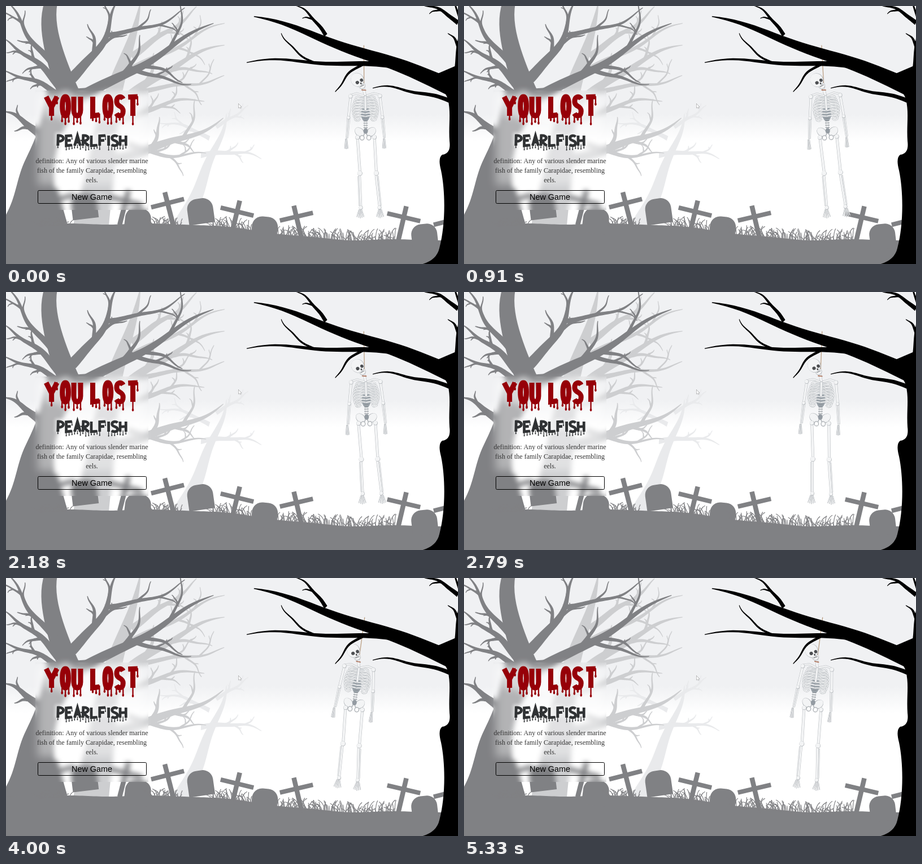
Write an HTML page with a canvas that moves like this. It is 800 by 458 pixels and loops after 5.36 s.

```html
<!DOCTYPE html>
<html lang="en">
<head>
<meta charset="utf-8">
<title>You Lost</title>
<style>
html, body { margin: 0; width: 100%; height: 100%; overflow: hidden; background: #fff; }
canvas { display: block; }
</style>
</head>
<body>
<canvas id="stage" width="800" height="458" role="img" aria-label="YOU LOST. PEARLFISH"></canvas>
<script>
const W = 800, H = 458, LOOP = 5360;
const ctx = document.getElementById('stage').getContext('2d');
const GRAY = '#808184';

function layer() {
  const c = document.createElement('canvas');
  c.width = W; c.height = H;
  return c.getContext('2d');
}

function random(seed) {
  return () => (seed = (seed * 16807) % 2147483647) / 2147483647;
}

function line(c, w, ...p) {
  c.lineWidth = w;
  c.beginPath();
  for (let i = 0; i < p.length; i += 2) c.lineTo(p[i], p[i + 1]);
  c.stroke();
}

function oval(c, x, y, rx, ry, color, tilt = 0) {
  c.fillStyle = color;
  c.beginPath();
  c.ellipse(x, y, rx, ry, tilt, 0, 7);
  c.fill();
}

// Tapered, slightly wavy branch; twigs sprout on alternating sides.
function bough(c, rnd, x0, y0, x1, y1, w, bend = 0, twigs = 3) {
  const len = Math.hypot(x1 - x0, y1 - y0), dir = Math.atan2(y1 - y0, x1 - x0);
  const nx = -Math.sin(dir), ny = Math.cos(dir);
  const phase = rnd() * 6, wave = Math.min(6, len * .035);
  const at = t => {
    const off = bend * Math.sin(Math.PI * t) + wave * Math.sin(t * 9 + phase) * t;
    return [x0 + (x1 - x0) * t + nx * off, y0 + (y1 - y0) * t + ny * off];
  };
  const thick = t => w * (1 - t) ** .85 + 1.2;
  const edge = side => t => {
    const [x, y] = at(t), r = thick(t) / 2 * side;
    return [x + nx * r, y + ny * r];
  };
  const steps = [...Array(31).keys()].map(i => i / 30);
  c.beginPath();
  [...steps.map(edge(1)), ...steps.reverse().map(edge(-1))].forEach(p => c.lineTo(...p));
  c.fill();
  for (let i = 0; i < twigs; i++) {
    const t = .3 + .5 * (i + rnd() * .5) / twigs, [x, y] = at(t);
    const a = dir + (i % 2 ? 1 : -1) * (.5 + rnd() * .5), l = len * (.2 + rnd() * .15);
    bough(c, rnd, x, y, x + l * Math.cos(a), y + l * Math.sin(a), thick(t) * .5, l * .1 * (i % 2 ? -1 : 1), twigs - 2);
  }
}

function tree(c, color, seed, boughs) {
  const rnd = random(seed);
  c.fillStyle = color;
  boughs.forEach(b => bough(c, rnd, ...b));
}

const smooth = (a, b, x) => {
  const u = Math.max(0, Math.min(1, (x - a) / (b - a)));
  return u * u * (3 - 2 * u);
};
const ground = x => 387 + 28 * smooth(300, 620, x) + Math.sin(x / 23);

function sky(c) {
  const g = c.createLinearGradient(0, 0, 0, 240);
  g.addColorStop(0, '#f0f1f3');
  g.addColorStop(.8, '#f0f1f3');
  g.addColorStop(1, '#fff');
  c.fillStyle = '#fff';
  c.fillRect(0, 0, W, H);
  c.fillStyle = g;
  c.fillRect(0, 0, W, 240);
}

function forest(c) {
  tree(c, '#e9eaec', 5, [
    [308, 392, 388, 190, 28, 8, 0],
    [345, 265, 452, 270, 9, -8],
    [360, 235, 270, 205, 7, 6],
    [372, 215, 430, 178, 6]
  ]);
  c.save();
  c.beginPath();
  c.rect(0, 0, 387, H);
  c.clip();
  tree(c, '#cdced0', 12, [
    [150, 395, 235, -5, 62, -8, 0],
    [190, 185, 387, 70, 18, -14],
    [178, 275, 385, 200, 20, 8],
    [182, 210, 350, 165, 12, -8],
    [222, 90, 340, 5, 12],
    [215, 115, 387, 30, 9],
    [235, 152, 387, 128, 8],
    [215, 245, 354, 263, 9, 10]
  ]);
  c.restore();
  tree(c, GRAY, 31, [
    [118, 170, 150, -130, 44, -55, 0],
    [90, 110, 5, -5, 12, -6],
    [92, 140, -5, 62, 13, 8],
    [95, 160, -5, 118, 11, 8],
    [72, 240, -5, 185, 17, 5, 2],
    [115, 130, 198, -5, 19, 12],
    [125, 165, 367, 30, 20, 3],
    [215, 108, 328, 138, 8, 4, 1],
    [176, 52, 318, 8, 8, 8, 2]
  ]);
  c.fill(new Path2D('M-2 374C18 340 18 310 32 278C46 248 62 220 74 150L146 145C120 190 100 215 90 255C78 300 86 350 108 392L-2 392Z'));
}

function cross(c, x, y, tilt) {
  c.save();
  c.translate(x, y);
  c.rotate(tilt);
  c.strokeStyle = GRAY;
  line(c, 8.5, 0, -20, 0, 44);
  line(c, 8, -30, 0, 30, 0);
  c.restore();
}

function stone(c, x, y, tilt) {
  c.save();
  c.translate(x, y);
  c.rotate(tilt);
  c.fillStyle = GRAY;
  c.beginPath();
  c.roundRect(-23, 0, 46, 45, [18, 18, 0, 0]);
  c.fill();
  c.restore();
}

function grass(c, x0, x1, tall) {
  const rnd = random(x0 * 31 + 7);
  c.strokeStyle = GRAY;
  c.lineWidth = 1.2;
  for (let x = x0; x < x1; x += 1.8) {
    const y = ground(x) + 4, lean = (rnd() - .5) * 28, h = tall * (.3 + .7 * rnd());
    c.beginPath();
    c.moveTo(x, y);
    c.quadraticCurveTo(x + lean * .2, y - h * .8, x + lean, y - h);
    c.stroke();
  }
}

function graveyard(c) {
  c.fillStyle = GRAY;
  c.beginPath();
  c.moveTo(0, H);
  for (let x = 0; x <= W; x += 5) c.lineTo(x, ground(x));
  c.lineTo(W, H);
  c.fill();
  [[92, 343, -.27], [212, 346, .25], [286, 350, -.25], [409, 365, .24],
    [514, 374, -.23], [704, 375, .23], [786, 381, -.25]].forEach(p => cross(c, ...p));
  [[136, 333, -.12], [236, 359, .12], [341, 342, -.14], [460, 374, .1], [738, 387, -.12]]
    .forEach(p => stone(c, ...p));
  [[58, 112, 16], [255, 310, 17], [364, 435, 22], [475, 560, 22], [560, 690, 25]]
    .forEach(p => grass(c, ...p));
}

function blackTree(c) {
  c.fillStyle = '#000';
  c.fill(new Path2D('M734 459Q762 452 767 430C778 390 778 330 770 292Q764 270 772 264Q788 262 785 240C783 210 788 190 782 165Q775 145 750 126L801 104V459Z'));
  tree(c, '#000', 8, [
    [800, 150, 438, 21, 30, 8, 0],
    [725, 110, 426, 101, 10, 6, 2],
    [795, 172, 649, 146, 7, 8, 0],
    [566, 52, 513, -2, 6, 5, 1],
    [800, 120, 798, -10, 14, 5, 1],
    [800, 30, 735, -5, 7, 5, 1]
  ]);
}

// Lettering: outlines in a unit box, with odd widths listed apart.
const GLYPHS = {
  Y: 'M0 0L.5 .55L1 0M.5 .5L.5 1',
  O: 'M.5 0C1.1 0 1.1 1 .5 1C-.1 1 -.1 0 .5 0Z',
  U: 'M0 0L0 .7C0 1.1 1 1.1 1 .7L1 0',
  L: 'M0 0L0 1L1 .95',
  S: 'M1 .12C.7 -.08 0 0 .05 .28C.1 .55 1 .45 1 .75C1 1.05 .3 1.05 0 .88',
  T: 'M0 .02L1 0M.5 0L.5 1',
  P: 'M0 1L.05 0C1.3 -.05 1.2 .6 .05 .58',
  E: 'M1 0L0 .04L0 1L1 .94M0 .5L.8 .47',
  A: 'M0 1L.5 0L1 1M.2 .66L.8 .64',
  R: 'M0 1L.05 0C1.2 -.05 1.2 .5 .05 .54L1 1',
  F: 'M0 1L0 .03L1 0M0 .5L.8 .47',
  I: 'M.5 0L.5 1',
  H: 'M0 0L0 1M1 0L1 1M0 .52L1 .48'
};
const WIDTHS = { Y: 1.6, T: 1.4, I: .2, ' ': .3 };

function lettering(c, word, y, unit, gap, h, pen, color) {
  const rnd = random(word.length * 97), all = new Path2D(), drips = [];
  const wide = ch => (WIDTHS[ch] || 1) * unit;
  let x = 152 - ([...word].reduce((s, ch) => s + wide(ch) + gap, -gap)) / 2;
  for (const ch of word) {
    const w = wide(ch);
    if (GLYPHS[ch]) {
      all.addPath(new Path2D(GLYPHS[ch]), new DOMMatrix([w, 0, 0, h, x, y]));
      const feet = 'YTI'.includes(ch) ? [.5] : 'PF'.includes(ch) ? [0] : [0, .5, 1];
      feet.forEach(f => drips.push([x + w * f, y + h * .9, pen * (.5 + rnd())]));
      if ('YTEF'.includes(ch)) drips.push([x + w, y, pen * (.7 + .5 * rnd())]);
    }
    x += w + gap;
  }
  c.save();
  c.filter = `blur(${pen * .6}px)`;
  c.strokeStyle = 'rgba(255,255,255,.5)';
  c.lineWidth = pen * 2.4;
  c.stroke(all);
  c.restore();
  c.strokeStyle = color;
  c.lineWidth = pen;
  c.stroke(all);
  c.lineCap = 'round';
  for (const [dx, top, len] of drips) {
    line(c, pen * .26, dx, top, dx, top + pen * .5 + len);
    oval(c, dx, top + pen * .5 + len, pen * .2, pen * .3, color);
  }
  c.lineCap = 'butt';
}

function panel(c) {
  const copy = layer();
  copy.drawImage(c.canvas, 0, 0);
  c.save();
  c.beginPath();
  c.rect(52, 150, 200, 212);
  c.clip();
  c.filter = 'blur(4px)';
  c.drawImage(copy.canvas, 0, 0);
  c.restore();
  c.save();
  c.filter = 'blur(8px)';
  c.fillStyle = 'rgba(255,255,255,.4)';
  c.fillRect(56, 158, 188, 160);
  c.restore();

  lettering(c, 'YOU LOST', 161, 11.9, 9, 34, 9, '#960008');
  lettering(c, 'PEARLFISH', 230, 10.2, 4.6, 18, 4.8, '#303234');

  c.textAlign = 'center';
  c.fillStyle = '#333';
  c.font = '12px "Liberation Serif", "Times New Roman", serif';
  ['definition: Any of various slender marine', 'fish of the family Carapidae, resembling', 'eels.']
    .forEach((s, i) => c.fillText(s, 152, 279 + 17 * i));
  c.strokeStyle = '#000';
  c.lineWidth = 1;
  c.beginPath();
  c.roundRect(56.5, 327.5, 192, 23, 2);
  c.stroke();
  c.fillStyle = '#000';
  c.font = '14.4px "Liberation Sans", Arial, sans-serif';
  c.fillText('New Game', 152, 344);
}

function cursor(c) {
  const arrow = new Path2D('M411.5 173.5v7.5l1.8-1.6 1.3 2.6 1.1-.6-1.2-2.5h2.2z');
  c.fillStyle = '#fff';
  c.strokeStyle = '#777';
  c.lineWidth = .9;
  c.stroke(arrow);
  c.fill(arrow);
}

const BONE = '#f3f4f5', RIM = '#b4b8bc';

function bone(c, w, ...p) {
  c.strokeStyle = RIM;
  line(c, w + 1, ...p);
  c.strokeStyle = BONE;
  line(c, w, ...p);
}

function knob(c, x, y, r) {
  oval(c, x, y, r + .5, r + .5, RIM);
  oval(c, x - .3, y - .3, r, r, BONE);
}

// fingers and toes
function fan(c, x, y, n, gap, len) {
  for (let i = 0; i < n; i++) {
    const d = (i - (n - 1) / 2) * gap;
    bone(c, .8, x + d * .4, y, x + d, y + len - Math.abs(d) * .4);
  }
}

function ribs(c, s) {
  for (let i = 0; i < 8; i++) {
    const y = 161 + i * 5, w = s * (14 + 8 * Math.sin((i + 1) * .32));
    const rib = new Path2D(`M635 ${y}Q${635 + w * 1.2} ${y - 4} ${635 + w} ${y + 6}Q${635 + w * .7} ${y + 10} ${635 + s * (3 + i)} ${y + 5}`);
    c.strokeStyle = '#a5aaae';
    c.lineWidth = 2.6;
    c.stroke(rib);
    c.strokeStyle = BONE;
    c.lineWidth = 1.7;
    c.stroke(rib);
  }
}

function side(c, s) {
  const elbow = 635 + s * 30, hip = 635.5 + s * 15, knee = 638.5 + s * 14.5, ankle = 641.5 + s * 16.5;
  ribs(c, s);
  bone(c, 2.4, 635 + s * 3, 159, 635 + s * 15, 155, 635 + s * 26, 158);
  bone(c, 3.6, 635 + s * 26, 161, elbow, 196);
  for (const d of [-1.5, 1.5]) bone(c, 1.6, elbow + d, 199, elbow + s * 3 + d * .7, 233);
  knob(c, 635 + s * 26, 160, 3.2);
  knob(c, elbow, 198, 2.6);
  fan(c, 634 + s * 33.5, 236, 4, 1.8, 17);
  oval(c, 634.5 + s * 10, 224, 10, 7.5, RIM, s * -.75);
  oval(c, 634.5 + s * 10.5, 223.5, 9, 6.5, BONE, s * -.75);
  oval(c, 634.5 + s * 6, 234, 4.5, 4.8, RIM);
  oval(c, 634.5 + s * 6, 234, 3, 3.3, '#fff');
  bone(c, 4, hip, 235, knee, 293);
  bone(c, 3.4, knee - .5, 302, ankle, 355);
  bone(c, 1.3, knee + s * 3, 303, ankle + s * 2.5, 354);
  knob(c, hip, 233, 3.4);
  knob(c, knee, 297, 4);
  knob(c, ankle, 358, 3);
  fan(c, ankle + s, 362, 5, 3, 14);
}

function skull(c) {
  const dark = '#4d4f52';
  c.save();
  c.translate(621.5, 131);
  c.rotate(-.5);
  oval(c, 2, 13, 6, 6, RIM);
  oval(c, 2, 12.5, 5.4, 5.4, BONE);
  oval(c, 0, 0, 11.5, 12.5, RIM);
  oval(c, -.4, -.4, 11, 12, BONE);
  oval(c, -2.5, 4, 3.1, 3, dark);
  oval(c, 6, 4, 2.8, 3, dark);
  oval(c, 2.3, 8.5, 1.3, 1.8, dark);
  c.strokeStyle = '#77797c';
  line(c, 1, -1.5, 13.2, 5.5, 13.2);
  c.restore();
}

function skeleton(c) {
  c.lineCap = c.lineJoin = 'round';
  c.strokeStyle = '#b89a7c';
  line(c, 1.2, 633.5, 70, 633, 150);
  bone(c, 4, 632, 146, 635, 160, 635, 222);
  oval(c, 635, 179, 16, 21, '#dadde0');
  oval(c, 635, 192, 8, 13, '#9ba3aa');
  side(c, -1);
  side(c, 1);
  bone(c, 3, 635, 161, 635, 184);
  c.strokeStyle = '#858b91';
  for (let y = 200; y < 220; y += 4) line(c, 1, 631.5, y, 638.5, y);
  oval(c, 635, 222, 4, 5, '#949ba2');
  skull(c);
  c.strokeStyle = '#a8694f';
  line(c, 1.6, 629, 149, 636, 149.5);
}

// Half a swing lasts 3435 ms, furthest right at 1165 ms.
const swing = t => (2.25 - 5.95 * Math.cos(Math.PI * (t - 1165) / 3435)) * Math.PI / 180;

const back = layer(), front = layer();
sky(back);
forest(back);
graveyard(back);
panel(back);
cursor(back);
blackTree(front);

let start;
function frame(now) {
  start ??= now;
  ctx.drawImage(back.canvas, 0, 0);
  ctx.save();
  ctx.translate(633, 80);
  ctx.rotate(swing((now - start) % LOOP));
  ctx.translate(-633, -80);
  skeleton(ctx);
  ctx.restore();
  ctx.drawImage(front.canvas, 0, 0);
  requestAnimationFrame(frame);
}
requestAnimationFrame(frame);
</script>
</body>
</html>
```
